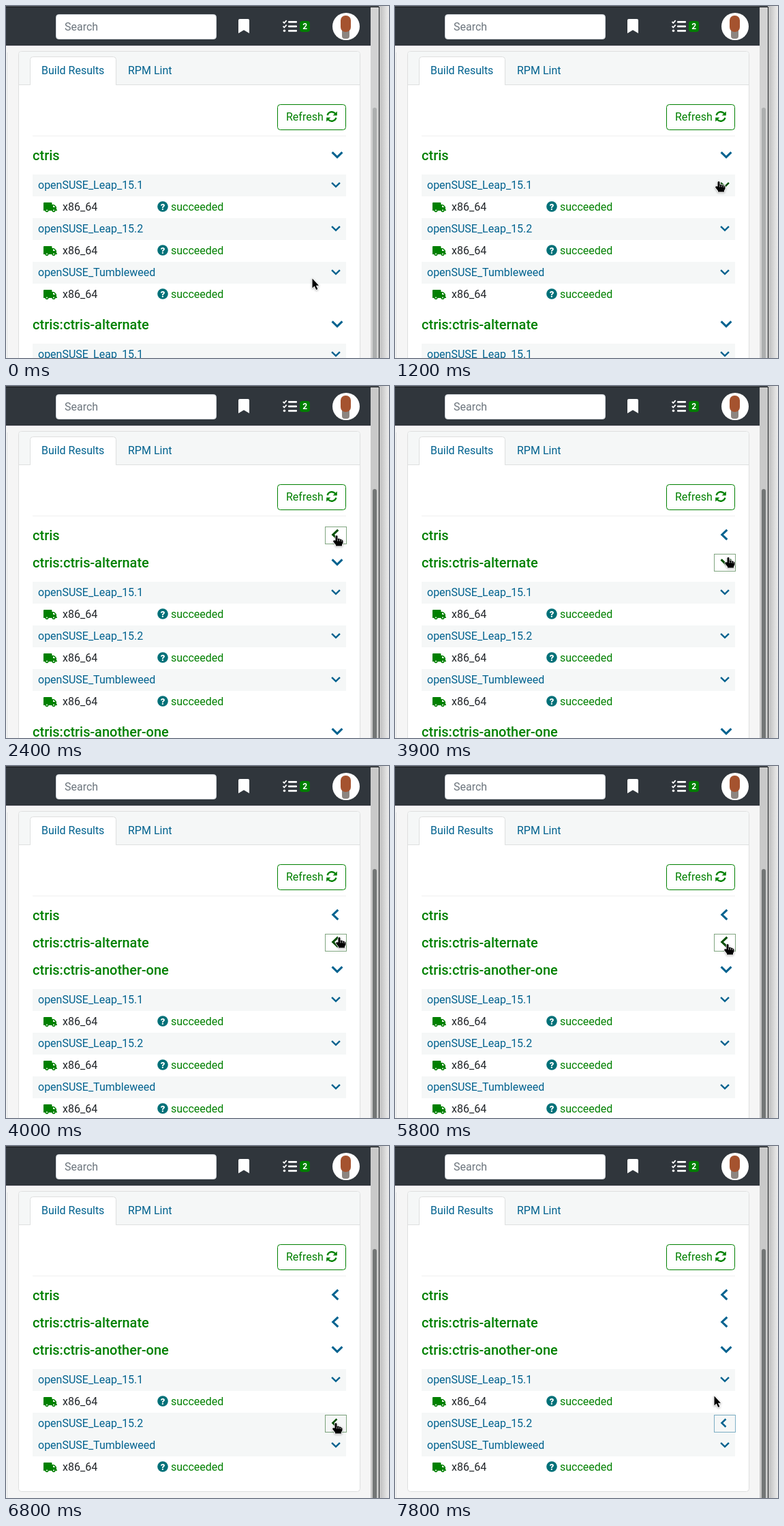
An HTML page with a canvas for the animation above (8 s loop, 562 by 516 pixels).

```html
<!DOCTYPE html>
<html lang="en">
<head>
<meta charset="utf-8">
<title>Build results</title>
<style>
html, body { margin: 0; width: 100%; height: 100%; overflow: hidden; background: #f5f5f5; }
canvas { display: block; }
</style>
</head>
<body>
<canvas id="stage" width="562" height="516"></canvas>
<script>
const ctx = document.getElementById('stage').getContext('2d');
const LOOP = 8000, STEP = 100;
const GREEN = '#008000', BLUE = '#00628f', HOVER = '#004d00', TEAL = '#007078';
const PALE = '#f5f7f7', BORDER = '#dedfdf', NAV = '#30363c', INK = '#212529';

const PROJECTS = ['ctris', 'ctris:ctris-alternate', 'ctris:ctris-another-one'];
const REPOS = ['openSUSE_Leap_15.1', 'openSUSE_Leap_15.2', 'openSUSE_Tumbleweed'];

// time, x, y of the pointer hot spot
const POINTER = [
  [0, 449, 399], [500, 449, 399], [600, 447, 383], [700, 447, 383],
  [900, 450, 365], [1100, 466, 290], [1300, 484, 224], [1400, 485, 219],
  [3200, 485, 219], [3300, 486, 225], [3500, 488, 245], [3600, 489, 251],
  [5700, 489, 251], [5800, 488, 261], [6000, 496, 295], [6200, 501, 340],
  [6400, 493, 395], [6500, 485, 409], [6600, 484, 406], [7600, 484, 406],
  [7700, 475, 388], [7800, 468, 366], [8000, 468, 366]
];
// when each toggle closes and takes focus
const CLOSES = { p0: 2400, p1: 4000, r21: 6800 };
const FOCUS = [[2100, 'p0'], [3900, 'p1'], [6700, 'r21']];

function pointerAt(t) {
  const i = POINTER.findIndex(k => k[0] > t);
  const [t0, x0, y0] = POINTER[i - 1], [t1, x1, y1] = POINTER[i];
  const u = (t - t0) / (t1 - t0);
  return [Math.round(x0 + (x1 - x0) * u), Math.round(y0 + (y1 - y0) * u)];
}

function rect(x, y, w, h, color) {
  ctx.fillStyle = color;
  ctx.fillRect(x, y, w, h);
}

function box(x, y, w, h, r, fill, stroke) {
  ctx.beginPath();
  ctx.roundRect(x, y, w, h, r);
  if (fill) { ctx.fillStyle = fill; ctx.fill(); }
  if (stroke) { ctx.strokeStyle = stroke; ctx.lineWidth = 1; ctx.stroke(); }
}

function disc(x, y, r, color) {
  ctx.beginPath();
  ctx.arc(x, y, r, 0, 2 * Math.PI);
  ctx.fillStyle = color;
  ctx.fill();
}

function text(str, x, y, color, size = 16, weight = 400) {
  ctx.font = `${weight} ${size}px Roboto, sans-serif`;
  ctx.fillStyle = color;
  ctx.fillText(str, x, y);
}

function at(x, y, draw) {
  ctx.save();
  ctx.translate(x, y);
  draw();
  ctx.restore();
}

function line(path, color, width) {
  ctx.strokeStyle = color;
  ctx.lineWidth = width;
  ctx.stroke(new Path2D(path));
}

function fill(path, color) {
  ctx.fillStyle = color;
  ctx.fill(new Path2D(path));
}

function drawTasks() {
  for (let i = 0; i < 3; i++) box(414, 22 + i * 6.5, 13, 2.8, 1, '#fff');
  line('M406.5 23.2l1.8 1.8 3.4-3.8M406.5 29.7l1.8 1.8 3.4-3.8', '#fff', 1.8);
  disc(408.5, 36.3, 1.8, '#fff');
}

function drawSync() {
  at(478, 162, () => {
    for (let i = 0; i < 2; i++) {
      line('M-6.4 -1.8A6.6 6.6 0 0 1 5 -4.4', GREEN, 2.3);
      fill('M7.8 -7.6V-1.4H1.6Z', GREEN);
      ctx.rotate(Math.PI);
    }
  });
}

function drawTruck(y) {
  at(55, y - 8, () => {
    fill('M1 1H11.5Q12.5 1 12.5 2V4H14.8Q15.6 4 16.2 4.6L18.4 6.8Q19 7.4 19 8.2V11.5H20V13H0V2Q0 1 1 1Z', GREEN);
    fill('M14 5.4H15L17.4 8H14Z', '#fff');
    for (const x of [5, 15]) {
      disc(x, 12.6, 2.6, GREEN);
      disc(x, 12.6, 1, '#fff');
    }
  });
}

function drawChevron(cy, big, closed, color) {
  ctx.lineCap = 'butt';
  ctx.lineJoin = 'miter';
  const s = big ? 1 : 0.8;
  at(big ? (closed ? 483 : 486) : (closed ? 482 : 484), cy - 1, () => {
    ctx.scale(s, s);
    line(closed ? 'M4.3 -7.2L-3.2 0L4.3 7.2' : 'M-7.4 -3.6L0 3.6L7.4 -3.6', color, 3.1);
  });
}

function drawToggle(id, cy, big, t, [px, py]) {
  const hovered = px >= 468 && px < 500 && py >= cy - 13 && py < cy + 13;
  const color = hovered ? HOVER : BLUE;
  const focus = FOCUS.filter(f => f[0] <= t).pop();
  drawChevron(cy, big, t >= CLOSES[id], color);
  if (focus && focus[1] === id) {
    ctx.setLineDash([1, 1]);
    box(468.5, cy - 12.5, 31, 25, 0, null, color);
    ctx.setLineDash([]);
  }
  return hovered;
}

function drawArch(y) {
  drawTruck(y);
  text('x86_64', 83, y + 5, INK);
  disc(230, y - 1, 7.8, TEAL);
  ctx.textAlign = 'center';
  text('?', 230, y + 3.6, '#fff', 13, 900);
  ctx.textAlign = 'left';
  text('succeeded', 242, y + 5, GREEN);
}

// Draws the project list; returns its bottom edge and whether a toggle is hovered.
function drawProjects(t, pointer) {
  let y = 219, hovered = false;
  PROJECTS.forEach((name, p) => {
    text(name, 39, y + 7, GREEN, 20, 500);
    hovered = drawToggle('p' + p, y, true, t, pointer) || hovered;
    if (t >= CLOSES['p' + p]) { y += 40; return; }
    y += 28;
    REPOS.forEach((repo, r) => {
      const id = `r${p}${r}`;
      rect(39, y, 460, 32, PALE);
      text(repo, 47, y + 21, BLUE);
      hovered = drawToggle(id, y + 16, false, t, pointer) || hovered;
      y += 32;
      if (t >= CLOSES[id]) return;
      drawArch(y + 16);
      y += 32;
    });
    y += 28;
  });
  return { bottom: y - 8, hovered };
}

function drawNav() {
  rect(0, 0, 535, 58, NAV);
  rect(0, 58, 535, 1, '#ded8e0');
  box(73.5, 12.5, 235, 36, 4, '#fff', '#ced4da');
  text('Search', 86, 36, '#6c757d');
  fill('M341 21Q341 19 343 19H355Q357 19 357 21V40L349 35.3L341 40Z', '#fff');
  drawTasks();
  box(431, 22, 15, 16, 4, GREEN);
  text('2', 435.2, 34.4, '#fff', 12, 700);
  disc(499, 30, 20, '#fff');
  box(493, 30, 11, 18, 4, '#8c8580');
  box(491, 14, 15, 24, 7, '#a5532f');
}

function drawCardTop() {
  box(18.5, 66.5, 501, 600, 4, '#fff', BORDER);
  box(19, 67, 500, 48, [4, 4, 0, 0], PALE);
  rect(19, 115, 500, 1, BORDER);
  box(35.5, 74.5, 126, 41, [4, 4, 0, 0], '#fff', BORDER);
  rect(36, 115, 125, 2, '#fff');
  text('Build Results', 52, 100, BLUE);
  text('RPM Lint', 179, 100, BLUE);
  box(398.5, 144.5, 100, 37, 4, '#fff', GREEN);
  text('Refresh', 411, 168, GREEN);
  drawSync();
  rect(39, 190, 460, 1, '#f0f0f0');
}

function drawCardBottom(bottom) {
  if (bottom > 516) return;
  rect(18, bottom - 5, 502, 520, '#f5f5f5');
  box(18.5, bottom - 20.5, 501, 20, [0, 0, 4, 4], '#fff', BORDER);
  rect(19, bottom - 22, 500, 3, '#fff');
}

function drawWindowEdge(t) {
  const active = t >= 2000;
  rect(535, 0, 12, 516, active ? '#c9c9c9' : '#d2d2d2');
  box(538, t >= 2400 ? 151 : 149, 6, 400, 3, active ? '#737676' : '#adafaf');
  const shade = ctx.createLinearGradient(548, 0, 562, 0);
  shade.addColorStop(0, '#bdbdbd');
  shade.addColorStop(1, '#ededed');
  rect(548, 0, 14, 516, shade);
  rect(547, 1, 1, 515, '#25282b');
  rect(0, 0, 547, 1, '#555a5e');
  rect(0, 1, 547, 1, '#191c1f');
}

function drawTooltip() {
  box(486, 242, 90, 45, 4, '#212425');
  text('Hide build results', 499, 270, '#ececec', 14.4);
}

function drawPointer([x, y], hand) {
  at(x, y, () => {
    ctx.lineJoin = 'round';
    const path = new Path2D(hand
      ? 'M-1.5 7.5V1.5Q-1.5 0 0 0T1.5 1.5V5Q4 4 4.6 5.5Q7 5 7.4 6.5Q9.5 6.2 9.5 8.5V11L8 13.5V15.5H-1V14L-4.5 9.5Q-5.5 7.5-3.5 7.2Z'
      : 'M0.5 0.5V14.5L3.6 11.6L6.2 17L8.4 16L5.9 10.8H10Z');
    ctx.shadowColor = 'rgba(0,0,0,.35)';
    ctx.shadowBlur = 3;
    ctx.shadowOffsetY = 1;
    ctx.strokeStyle = '#fff';
    ctx.lineWidth = 1.6;
    ctx.stroke(path);
    ctx.shadowColor = 'transparent';
    ctx.fillStyle = '#000';
    ctx.fill(path);
    if (hand) line('M1.7 5.5V8.5M4.5 6V8.5M7.2 7V9', '#fff', 0.7);
  });
}

function draw(t) {
  const pointer = pointerAt(t);
  rect(0, 0, 562, 516, '#f5f5f5');
  rect(0, 68, 1, 448, '#fff');
  rect(1, 68, 1, 448, BORDER);
  drawNav();
  drawCardTop();
  const { bottom, hovered } = drawProjects(t, pointer);
  drawCardBottom(bottom);
  drawWindowEdge(t);
  if (t >= 2000 && t < 2100) drawTooltip();
  drawPointer(pointer, hovered);
}

const start = performance.now();
function tick() {
  const t = (performance.now() - start) % LOOP;
  draw(Math.floor(t / STEP) * STEP);
  requestAnimationFrame(tick);
}
tick();
</script>
</body>
</html>
```
